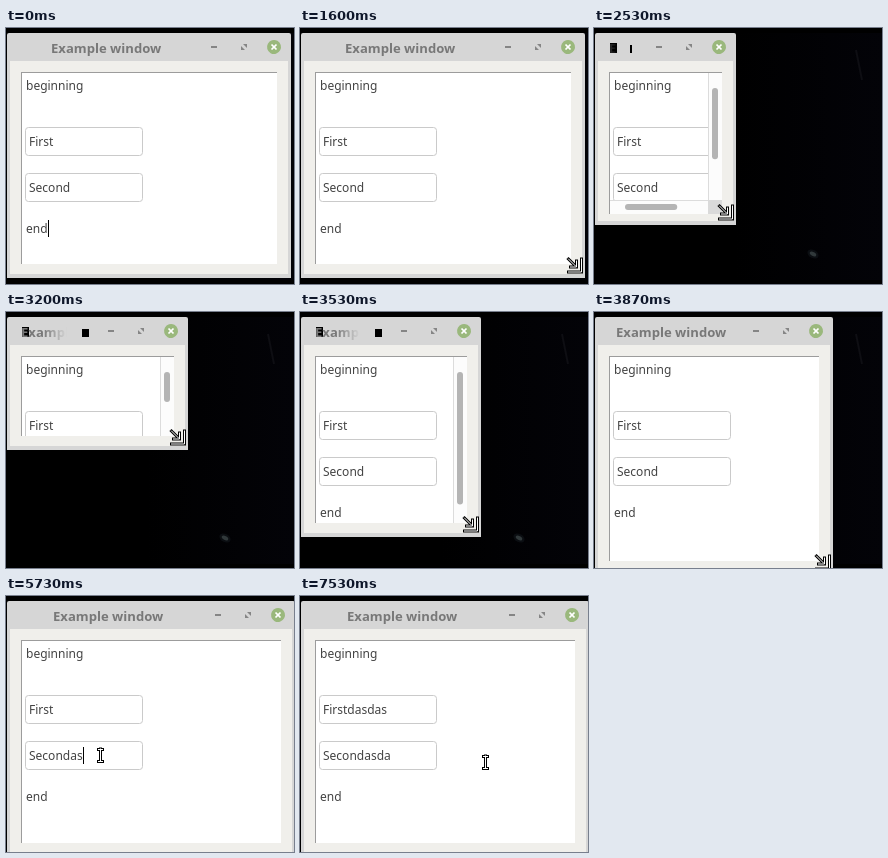
These frames come from a looping animation (288x256 px, 8000 ms). An HTML page with a canvas:

```html
<!DOCTYPE html>
<html lang="en">
<head>
<meta charset="utf-8">
<title>Example window</title>
<style>
html, body { margin: 0; width: 288px; height: 256px; overflow: hidden; background: #000; }
canvas { display: block; }
</style>
</head>
<body>
<canvas id="stage" width="288" height="256"></canvas>
<script>
const ctx = document.getElementById('stage').getContext('2d');
const LOOP = 8000, STEPS = 120;
const SANS = '"Noto Sans", "Open Sans", sans-serif';
const CONTENT = { w: 125, h: 170 };
// steps at which the pointer arrives, reaches the corner and turns to the text
const ENTER = 19, GRAB = 24, EDIT = 73;
const CLICK_SECOND = 80, CLICK_FIRST = 93, BLUR = 106;

const smooth = u => u * u * (3 - 2 * u);
const linear = u => u;

// keys are [step, x, y]
function along(keys, n, ease) {
  let i = 1;
  while (i < keys.length - 1 && n > keys[i][0]) i++;
  const [s, x, y] = keys[i - 1], [e, x2, y2] = keys[i];
  const u = ease(Math.min(1, Math.max(0, (n - s) / (e - s))));
  return [Math.round(x + (x2 - x) * u), Math.round(y + (y2 - y) * u)];
}

// lower right corner of the window
const corner = n => along([[29, 285, 250], [38, 142, 197], [48, 182, 138],
  [55, 181, 246], [58, 239, 263], [69, 289, 261]], n, smooth);
const arriving = n => along([[ENTER, 281, 24], [GRAB, 267, 228]], n, smooth);
const editing = n => along([[EDIT, 264, 236], [81, 95, 159], [88, 95, 159],
  [92, 99, 117], [98, 99, 117], [104, 186, 166]], n, linear);

function rect(x, y, w, h, color) {
  ctx.fillStyle = color;
  ctx.fillRect(x, y, w, h);
}

function round(x, y, w, h, r, fill, stroke) {
  ctx.beginPath();
  ctx.roundRect(x, y, w, h, r);
  ctx.fillStyle = fill;
  ctx.fill();
  if (stroke) {
    ctx.strokeStyle = stroke;
    ctx.lineWidth = 1;
    ctx.stroke();
  }
}

function disc(x, y, rx, ry, color) {
  ctx.fillStyle = color;
  ctx.beginPath();
  ctx.ellipse(x, y, rx, ry, 0.5, 0, 7);
  ctx.fill();
}

function strokePaths(paths, color, width) {
  ctx.strokeStyle = color;
  ctx.lineWidth = width;
  ctx.beginPath();
  for (const path of paths) {
    path.forEach(([x, y], i) => i ? ctx.lineTo(x, y) : ctx.moveTo(x, y));
  }
  ctx.stroke();
}

function outlined(paths) {
  ctx.lineCap = 'square';
  strokePaths(paths, '#000', 3);
  strokePaths(paths, '#fff', 1);
  ctx.lineCap = 'butt';
}

function triangle(x, y, dx, dy, color) {
  ctx.fillStyle = color;
  ctx.beginPath();
  ctx.moveTo(x, y);
  ctx.lineTo(x + dx, y);
  ctx.lineTo(x, y + dy);
  ctx.fill();
}

function text(str, x, y) {
  ctx.font = '12px ' + SANS;
  ctx.fillStyle = '#434343';
  ctx.fillText(str, x, y);
  return Math.round(x + ctx.measureText(str).width);
}

function caret(x, y) {
  rect(x, y, 1, 17, '#000');
}

function backdrop() {
  const glow = ctx.createLinearGradient(140, 0, 288, 0);
  glow.addColorStop(0, '#000');
  glow.addColorStop(1, '#030308');
  rect(0, 0, 288, 256, '#000');
  rect(140, 5, 148, 247, glow);
  strokePaths([[[262, 22], [268, 52]]], '#0e0e13', 2);
  disc(219, 226, 6, 4, '#0b0e12');
  disc(219, 226, 3.5, 2, '#30383a');
}

function title(R) {
  const str = 'Example window', gray = '#787878';
  ctx.font = 'bold 13.1px ' + SANS;
  const x = Math.round((R - 85 - ctx.measureText(str).width) / 2);
  ctx.fillStyle = gray;
  if (x < 14) {
    // the shrinking title fades out and leaves unpainted spots
    const end = Math.max(25, R - 121);
    const fade = ctx.createLinearGradient(end - 24, 0, end, 0);
    fade.addColorStop(0, gray);
    fade.addColorStop(1, gray + '00');
    rect(16, 15, 7, 10, '#000');
    rect(R - 106, 17, R > 160 ? 7 : 2, 8, '#000');
    ctx.fillStyle = fade;
  }
  ctx.fillText(str, Math.max(15, x), 25);
}

function buttons(R) {
  const max = R - 47, close = R - 17;
  rect(R - 80, 18, 6, 2, '#858585');
  triangle(max - 3, 22, 4, -4, '#858585');
  triangle(max + 3, 16, -4, 4, '#858585');
  disc(close, 19, 7, 7, '#9ab87c');
  for (const d of [-2.5, 2.5]) {
    strokePaths([[[close - d, 16.5], [close + d, 21.5]]], '#fff', 1.7);
  }
}

function entry(y, str, focused) {
  round(19.5, y + 0.5, 117, 28, 3, '#fff', '#cacaca');
  const end = text(str, 23, y + 19);
  if (focused) caret(end, y + 6);
}

function scrollbars(right, bottom) {
  const vbar = bottom - 44 < CONTENT.h;
  const viewR = vbar ? right - 14 : right;
  const hbar = viewR - 15 < CONTENT.w;
  const viewB = hbar ? bottom - 14 : bottom;
  const thumb = (view, size) => Math.max(30, (view - 28) * Math.min(1, view / size) - 4);
  if (vbar) {
    rect(viewR, 45, 14, bottom - 45, '#fcfcfc');
    rect(viewR, 45, 1, viewB - 45, '#dcdcdc');
    round(viewR + 4, 60, 6, thumb(viewB - 44, CONTENT.h), 3, '#b4b4b4');
  }
  if (hbar) {
    rect(16, viewB, viewR - 16, 14, '#fcfcfc');
    rect(16, viewB, viewR - 16, 1, '#dcdcdc');
    round(31, viewB + 4, thumb(viewR - 15, CONTENT.w), 6, 3, '#b4b4b4');
    if (vbar) rect(viewR, viewB, 14, 14, '#dadada');
  }
}

const typed = (word, extra, count) => word + extra.slice(0, Math.max(0, count));

function content(n, right, bottom) {
  const blink = n < GRAB && n % 15 < 7;
  ctx.save();
  ctx.beginPath();
  ctx.rect(15, 44, right - 15, bottom - 44);
  ctx.clip();
  rect(15, 44, 288, 256, '#fff');
  text('beginning', 20, 62);
  entry(99, typed('First', 'dasdas', n - 95), n >= CLICK_FIRST && n < BLUR);
  entry(145, typed('Second', 'asda', (n - 85) * 2), n >= CLICK_SECOND && n < CLICK_FIRST);
  const end = text('end', 20, 205);
  if (blink || (n >= EDIT && n < CLICK_SECOND)) caret(end, 192);
  scrollbars(right, bottom);
  rect(15, 44, right - 15, 1, '#9c9c9c');
  rect(15, 44, 1, bottom - 44, '#9c9c9c');
  ctx.restore();
}

function drawWindow(n, R, B) {
  round(1, 5, R - 1, B - 5, [2, 2, 0, 0], '#d6d6d6');
  rect(4, 33, R - 7, B - 37, '#f0efeb');
  title(R);
  buttons(R);
  content(n, R - 14, B - (R < 150 ? 11 : 14));
}

function resizeCursor() {
  outlined([[[15, 2], [15, 15], [2, 15]], [[2, 2], [9, 9]], [[10, 4], [10, 10], [4, 10]]]);
}

function arrowCursor() {
  triangle(0, 0, 12, 16, '#000');
  triangle(1, 2, 8, 11, '#fff');
}

function beamCursor() {
  outlined([[[-2, -5.5], [2, -5.5]], [[0, -6], [0, 6]], [[-2, 6.5], [2, 6.5]]]);
}

function pointer(n, R, B) {
  if (n < ENTER) return;
  const [pos, shape] = n < GRAB ? [arriving(n), arrowCursor]
    : n < EDIT ? [[R - 18, B - 21], resizeCursor]
    : [editing(n), beamCursor];
  ctx.save();
  ctx.translate(pos[0] - 0.5, pos[1]);
  shape();
  ctx.restore();
}

function draw(now) {
  const n = Math.floor((now + 5) * STEPS / LOOP) % STEPS;
  const [R, B] = corner(n);
  backdrop();
  drawWindow(n, R, B);
  pointer(n, R, B);
}

let start;
function tick(now) {
  start ??= now;
  draw(now - start);
  requestAnimationFrame(tick);
}
draw(0);
requestAnimationFrame(tick);
</script>
</body>
</html>
```
